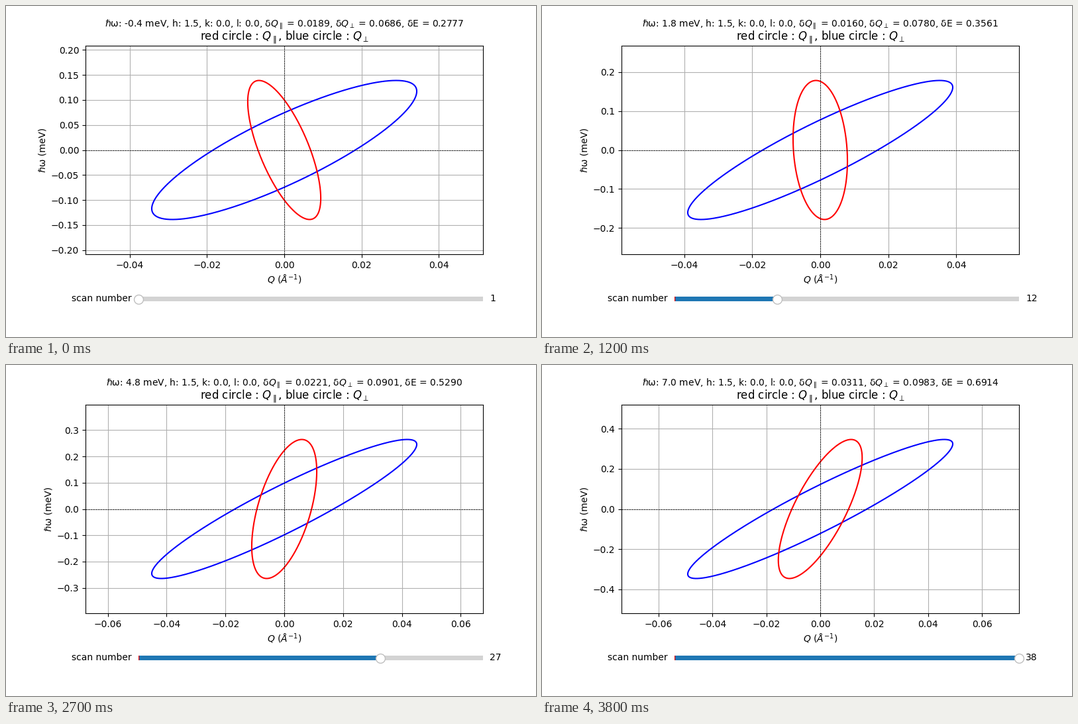
A matplotlib script for the animation above (3900 ms loop, 800 px wide and 500 px high).

```python
import numpy as np
import matplotlib.pyplot as plt
from matplotlib.animation import FuncAnimation
from matplotlib.widgets import Slider

SCANS = 38
PHASE = np.linspace(0, 2 * np.pi, 400)


# Resolution widths and ellipse phase lags as functions of energy transfer w.
def energy_width(w):
    return np.sqrt(.083173 + .016594 * w + .0037501 * w**2 + .00027681 * w**3)


def par_width(w):
    return .01 * np.sqrt(3.232 - .76638 * w + .21053 * w**2 + .00434 * w**3)


def perp_width(w):
    return .070326 + .0043268 * w - 3.53e-5 * w**2 - 1.73e-6 * w**3


def par_lag(w):
    return np.arctan2(1, -.8 + .395 * w - .0235 * w**2 + .0008 * w**3)


def perp_lag(w):
    return np.arcsin(.334 + .178 * np.exp(-.32 * w))


fig, ax = plt.subplots(figsize=(8, 5), dpi=100)
fig.subplots_adjust(left=.15, right=.9, bottom=.25, top=.88)
ax.set_title(r"red circle : $Q_\parallel$, blue circle : $Q_\perp$")
ax.set_xlabel(r"$Q\ (\AA^{-1})$")
ax.set_ylabel("ℏω (meV)")
ax.grid(True)
perp_line, = ax.plot([], [], color="blue", solid_capstyle="butt")
par_line, = ax.plot([], [], color="red", solid_capstyle="butt")
for draw_axis in (ax.axhline, ax.axvline):
    draw_axis(0, color="black", lw=.5, ls="--")
info = ax.text(.5, 1.1, "", transform=ax.transAxes, ha="center", va="center")

slider = Slider(fig.add_axes([.25, .1, .65, .03]), "scan number", 1, SCANS,
                valinit=1, valstep=1, valfmt="%d")
slider.drawon = False


def set_ellipse(line, width, height, lag):
    line.set_data(width / 2 * np.cos(PHASE), height / 2 * np.cos(PHASE - lag))


def update(frame):
    scan = max(1, frame)
    w = round(-.4 + .2 * (scan - 1), 1) + 0
    par, perp, energy = par_width(w), perp_width(w), energy_width(w)
    set_ellipse(par_line, par, energy, par_lag(w))
    set_ellipse(perp_line, perp, energy, perp_lag(w))
    ax.set_xlim(-.75 * perp, .75 * perp)
    ax.set_ylim(-.75 * energy, .75 * energy)
    info.set_text(
        rf"ℏω: {w:.1f} meV, h: 1.5, k: 0.0, l: 0.0, "
        rf"δ$Q_\parallel$ = {par:.4f}, δ$Q_\perp$ = {perp:.4f}, δE = {energy:.4f}")
    slider.set_val(scan)
    return perp_line, par_line, info


anim = FuncAnimation(fig, update, frames=SCANS + 1, init_func=lambda: update(0),
                     interval=100, repeat=True, repeat_delay=0, blit=False)
plt.show()
```
